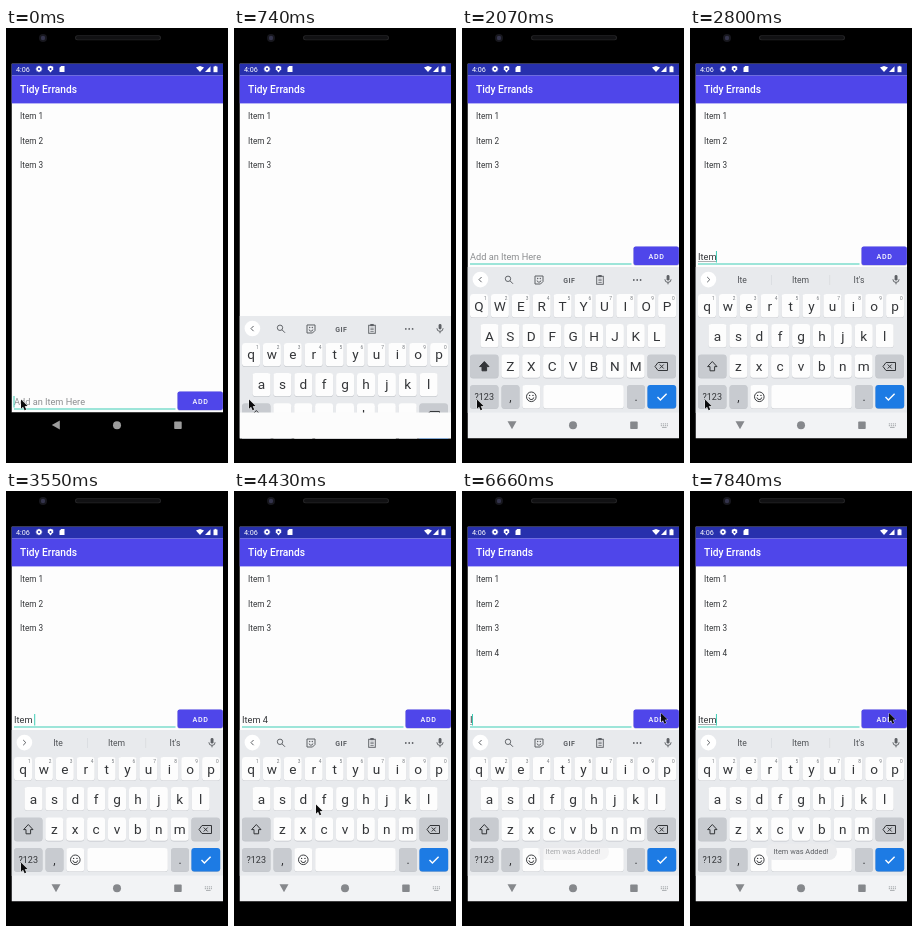
An HTML page with a canvas that plays this animation: 222x435 px, repeating every 8000 ms.

```html
<!DOCTYPE html>
<html lang="en">
<head>
<meta charset="utf-8">
<title>Tidy Errands</title>
<style>
html, body { margin: 0; width: 100%; height: 100%; overflow: hidden; background: #000; }
canvas { display: block; width: 222px; height: 435px; }
</style>
</head>
<body>
<canvas id="stage"></canvas>
<script>
const W = 222, H = 435, LOOP = 8000;
const INDIGO = '#4f46ea', STATUS = '#2730ad', TEAL = '#3fcdb6';
const INK = '#333538', ICON = '#5d6065', WHITE = '#fdfdfd', GREY = '#c8cbd0';
const LEFT = 5.5, TOP = 35.5, WIDE = 211.5, NAV_Y = 384.5, BOTTOM = 410.5;
const canvas = document.getElementById('stage');
const c = canvas.getContext('2d');
const dpr = window.devicePixelRatio || 1;
canvas.width = W * dpr;
canvas.height = H * dpr;

// Keystrokes and focus changes; each one restarts the caret blink
const EDITS = [
  { from: -360 },
  { from: 740 },
  { from: 1120 },
  { from: 2220, text: 'Item', step: 146 },
  { from: 3400, text: ' 4', step: 440 },
  { from: 5910, clear: true },
  { from: 6660, text: 'Item', step: 245 }
];

const clamp = v => Math.max(0, Math.min(1, v));
const within = (t, a, b = LOOP) => t >= a && t < b;

function fieldState(t) {
  let typed = '', touched = 0;
  for (const { from, text = '', step = 1, clear } of EDITS) {
    if (t < from) break;
    if (clear) typed = '';
    const n = Math.min(text.length, Math.floor((t - from) / step) + 1);
    typed += text.slice(0, n);
    touched = from + Math.max(n - 1, 0) * step;
  }
  return { typed, caret: Math.floor((t - touched) / 500) % 2 === 0 };
}

function pointer(t) {
  if (t < 4430) return [15, 371.5];
  const k = Math.min(7, Math.floor((t - 4430) / 148.5)) / 7 - 1;
  const back = 1 + 2.7 * k ** 3 + 1.7 * k ** 2;
  return [82 + 117 * back, 313.5 - 91.5 * back];
}

function rect(x, y, w, h, fill) {
  c.fillStyle = fill;
  c.fillRect(x, y, w, h);
}

function round(x, y, w, h, r, fill) {
  c.fillStyle = fill;
  c.beginPath();
  c.roundRect(x, y, w, h, r);
  c.fill();
}

function disc(x, y, r, fill) {
  c.fillStyle = fill;
  c.beginPath();
  c.arc(x, y, r, 0, 7);
  c.fill();
}

function arc(x, y, r, color, from = 0, to = 2 * Math.PI) {
  c.strokeStyle = color;
  c.lineWidth = 0.95;
  c.beginPath();
  c.arc(x, y, r, from, to);
  c.stroke();
}

function path(points, { fill, stroke, width = 1, close = !!fill } = {}) {
  c.beginPath();
  points.forEach(([x, y]) => c.lineTo(x, y));
  if (close) c.closePath();
  if (fill) { c.fillStyle = fill; c.fill(); }
  if (stroke) { c.strokeStyle = stroke; c.lineWidth = width; c.stroke(); }
}

function text(s, x, y, size, color, { align = 'left', weight = 400, spacing = 0 } = {}) {
  c.font = `${weight} ${size}px Roboto, Arial, sans-serif`;
  c.letterSpacing = spacing + 'px';
  c.textAlign = align;
  c.fillStyle = color;
  c.fillText(s, x, y);
  const width = c.measureText(s).width;
  c.letterSpacing = '0px';
  return width;
}

const label = (s, x, y, size, color, more) => text(s, x, y, size, color, { align: 'center', ...more });

function smile(x, y, r, color) {
  disc(x - r * 0.7, y - 1.8, 0.7, color);
  disc(x + r * 0.7, y - 1.8, 0.7, color);
  arc(x, y, r, color, 0.1, Math.PI - 0.1);
}

function phone() {
  rect(0, 0, W, H, '#000');
  disc(37, 10, 4, '#17171d');
  disc(37, 10, 2.2, '#34344c');
  round(69, 7.2, 86, 5, 2.5, '#252527');
  round(70, 8, 84, 3.4, 1.7, '#111113');
}

function statusBar() {
  rect(LEFT, TOP, WIDE, 12, STATUS);
  text('4:06', 10, 44, 7.2, '#fff');
  for (let a = 0; a < 6; a += Math.PI / 4) disc(33 + 2.5 * Math.cos(a), 41 + 2.5 * Math.sin(a), 0.8, '#fff');
  disc(33, 41, 2.4, '#fff');
  disc(33, 41, 1.1, STATUS);
  path([[44.5, 37.8], [47.2, 38.8], [47.2, 41.3], [44.5, 44.5], [41.8, 41.3], [41.8, 38.8]], { fill: '#fff' });
  disc(44.5, 41, 1, STATUS);
  path([[55.2, 38], [58.5, 38], [58.5, 44], [53.5, 44], [53.5, 39.7]], { fill: '#fff' });
  path([[190, 39.5], [194, 38], [198, 39.5], [194, 44]], { fill: '#fff' });
  path([[199, 44], [204.5, 44], [204.5, 38.2]], { fill: '#fff' });
  rect(207.5, 38.6, 4, 5.6, '#fff');
  rect(208.6, 37.9, 1.8, 1, '#fff');
}

function appBar() {
  rect(LEFT, 47.5, WIDE, 27.9, INDIGO);
  text('Tidy Errands', 14, 65.2, 10.2, '#fff', { weight: 500 });
}

function list(count) {
  for (let i = 0; i < count; i++) text('Item ' + (i + 1), 14, 91 + i * 24.6, 8.2, INK);
}

function inputRow(t) {
  const { typed, caret } = fieldState(t);
  let end = 8;
  c.save();
  if (t >= 880) c.translate(0, -145);
  if (typed) {
    end += text(typed, 8, 377, 9.2, INK);
    const composing = within(t, 2220, 3100) || t >= 6660;
    if (composing) rect(8, 378.4, end - 8, 0.6, '#77797c');
  } else {
    text('Add an Item Here', 8, 377, 9.2, '#8b8d8f');
  }
  if (caret) rect(end - 0.5, 368, 1, 11.5, TEAL);
  rect(8, 380.5, 161.5, 1, TEAL);
  round(171.4, 363.7, 45.6, 18.9, 2, '#aaa7d8');
  round(171.6, 363.4, 45.2, 18.6, 2, within(t, 5620, 6210) ? '#7061ec' : INDIGO);
  label('ADD', 194.6, 375.6, 7.15, '#fff', { weight: 500, spacing: 0.64 });
  c.restore();
}

function toolbar(words) {
  const d = words ? 1 : -1;
  disc(18.4, 251.6, 7.8, '#fff');
  path([[18.4 - d * 1.2, 249], [18.4 + d * 1.4, 251.6], [18.4 - d * 1.2, 254.2]], { stroke: ICON });

  round(204.6, 247, 2.9, 5.6, 1.45, ICON);
  arc(206, 251.3, 3.1, ICON, 0, Math.PI);
  rect(205.5, 254.3, 1, 2, ICON);

  if (words) {
    ['Ite', 'Item', "It's"].forEach((w, i) => {
      label(w, 52 + i * 58.5, 255, 8.6, '#505357');
      if (i) rect(22.5 + i * 58.5, 247, 0.6, 10, '#d3d6da');
    });
    return;
  }
  arc(46, 250.8, 2.7, ICON);
  path([[48, 252.8], [51, 255.8]], { stroke: ICON });
  path([[73, 248], [81, 248], [81, 253.5], [78.5, 256], [73, 256]], { stroke: ICON, close: true });
  smile(77, 252.3, 1.9, ICON);
  label('GIF', 107.2, 254.6, 7, ICON, { weight: 700, spacing: 0.4 });
  c.strokeRect(134.7, 248.3, 6.6, 8);
  rect(136.3, 247, 3.4, 2.2, ICON);
  for (let i = 0; i < 3; i++) {
    rect(136.4, 250.8 + i * 1.6, 3.3, 0.7, ICON);
    disc(171.8 + i * 3.4, 252, 0.9, ICON);
  }
}

function key(x, y, w, fill, s = '', size = 12, dy = 16) {
  round(x, y + 0.6, w, 23.4, 3, '#c3c6cb');
  round(x, y, w, 23.4, 3, fill);
  label(s, x + w / 2, y + dy, size, INK);
}

function keyRow(letters, x, y, upper, digits) {
  [...letters].forEach((ch, i) => {
    const left = x + i * 20.9;
    key(left, y, 18, WHITE, upper ? ch.toUpperCase() : ch, 13.6, 16.5);
    if (digits) label((i + 1) % 10, left + 15.3, y + 5.8, 4.8, '#74787d');
  });
}

function keyboard(t) {
  const upper = within(t, 2070, 2220) || within(t, 6510, 6660);
  c.save();
  c.translate(0, 146 * (1 - clamp((t - 640) / 240)) ** 2);
  rect(LEFT, 239, WIDE, 146, '#e8eaed');
  toolbar(within(t, 2660, 4140) || t >= 7840);
  keyRow('qwertyuiop', 8, 266, upper, true);
  keyRow('asdfghjkl', 18.5, 296, upper);
  keyRow('zxcvbnm', 39.3, 326.4, upper);

  key(8, 326.4, 28.5, GREY);
  path([[22.3, 333.5], [27, 338.6], [24.6, 338.6], [24.6, 342.8], [20, 342.8], [20, 338.6], [17.6, 338.6]],
    { stroke: INK, fill: upper ? INK : GREY });
  key(185.4, 326.4, 28.5, GREY);
  path([[193, 338.5], [196, 334.5], [205.5, 334.5], [205.5, 342.5], [196, 342.5]], { stroke: INK, close: true });
  for (const d of [-2, 2]) path([[199.7 - d, 336.5], [199.7 + d, 340.5]], { stroke: INK });

  key(8, 357, 28.5, GREY, '?123', 9, 15.3);
  key(39.5, 357, 18, GREY, ',');
  key(60.3, 357, 18, WHITE);
  arc(69.3, 368.8, 4.8, INK);
  smile(69.3, 369.2, 2.4, INK);
  key(81.2, 357, 80.6, WHITE);
  key(165, 357, 18, GREY, '.');
  key(185.4, 357, 28.8, '#1d7be4');
  path([[195.5, 369], [198.4, 371.9], [204.6, 365.7]], { stroke: '#fff', width: 1.4 });
  c.restore();
}

function navBar(t) {
  const open = t >= 740;
  const color = open ? '#86888c' : '#9c9c9c';
  rect(LEFT, NAV_Y, WIDE, BOTTOM - NAV_Y, !open ? '#000' : t < 1030 ? '#fcfcfc' : '#f2f3f5');
  c.save();
  if (open) c.globalAlpha = clamp((t - 860) / 320);
  c.save();
  c.translate(50, 397);
  if (!open) c.rotate(Math.PI / 2);
  path([[-4.5, -3.8], [4.5, -3.8], [0, 4.2]], { fill: color });
  c.restore();
  disc(111, 397.3, 4, color);
  round(168.2, 393.6, 7.5, 7.5, 0.8, color);
  if (t >= 440) {
    for (let i = 0; i < 8; i++) rect(198.8 + i % 4 * 2, 395.3 + (i >> 2) * 1.8, 1.2, 1.1, '#a9acb0');
    rect(200, 398.9, 4.6, 1, '#a9acb0');
  }
  c.restore();
}

function toast(t) {
  c.globalAlpha = clamp((t - 6450) / 420);
  round(76, 352.5, 71, 16.5, 8, '#ebecee');
  label('Item was Added!', 111, 363, 7.4, '#5c5f63');
  c.globalAlpha = 1;
}

function mouse(t) {
  c.save();
  c.translate(...pointer(t));
  c.scale(0.9, 0.9);
  const arrow = [[0, 0], [0, 10.2], [2.3, 8.1], [4, 12], [5.8, 11.2], [4.1, 7.4], [7.3, 7.3]];
  path(arrow, { stroke: 'rgba(255,255,255,.7)', close: true });
  path(arrow, { fill: '#0b0b0c' });
  c.restore();
}

function draw(t) {
  c.setTransform(dpr, 0, 0, dpr, 0, 0);
  phone();
  c.save();
  c.beginPath();
  c.rect(LEFT, TOP, WIDE, BOTTOM - TOP);
  c.clip();
  rect(LEFT, TOP, WIDE, NAV_Y - TOP, WHITE);
  statusBar();
  appBar();
  list(t >= 6210 ? 4 : 3);
  inputRow(t);
  if (t >= 740) keyboard(t);
  navBar(t);
  toast(t);
  c.restore();
  mouse(t);
}

const start = performance.now();
function tick() {
  draw((performance.now() - start) % LOOP);
  requestAnimationFrame(tick);
}
tick();
</script>
</body>
</html>
```
